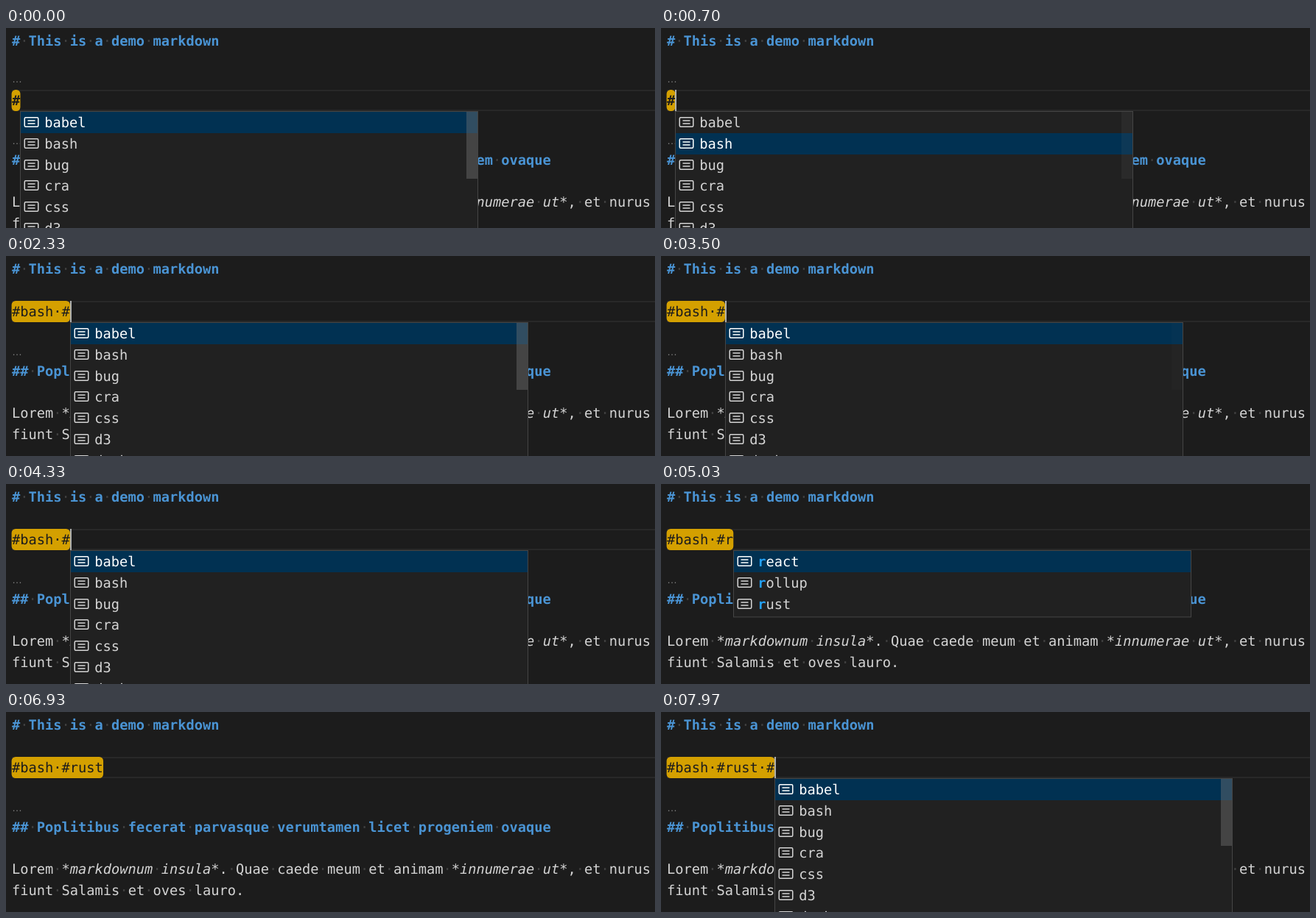
Animation of 881x272 px, one loop 8000 ms. Source, as an HTML page with a canvas:

```html
<!DOCTYPE html>
<html lang="en">
<head>
<meta charset="utf-8">
<title>Tag completion in a markdown editor</title>
<style>
  html, body { margin: 0; width: 100%; height: 100%; overflow: hidden; background: #1c1c1c; }
  canvas { display: block; }
</style>
</head>
<body>
<canvas id="stage" width="881" height="272"></canvas>
<script>
const ctx = document.getElementById('stage').getContext('2d');
const WIDTH = 881, HEIGHT = 272, LOOP = 8000;
const LEFT = 8, CHAR = 11.26, ROW = 28.8, LENS = 23, BASELINE = 21;
const MENU_WIDTH = 621, BLINK = 500;
const MONO = '18.7px "DejaVu Sans Mono", monospace';
const COLOR = {
  back: '#1c1c1c', text: '#d4d4d4', heading: '#4a94d4', dot: '#404040', lens: '#808080',
  line: '#282828', pill: '#d4a000', cursor: '#aeafad',
  menu: '#212121', border: '#454545', selected: '#013152', match: '#23a0f8',
  thumb: 'rgba(121,121,121,.4)'
};

const ALL = ['babel', 'bash', 'bug', 'cra', 'css', 'd3', 'docker'];
const R_TAGS = ['react', 'rollup', 'rust'];

// What the tag line and its suggestion list show from each moment on.
const steps = [
  { at: -550, text: '#', items: ALL, selected: 0 },
  { at: 500, text: '#', items: ALL, selected: 1 },
  { at: 920, text: '#bash' },
  { at: 1900, text: '#bash ' },
  { at: 2260, text: '#bash #', items: ALL, selected: 0 },
  { at: 4400, text: '#bash #r', items: R_TAGS, selected: 0, match: 1 },
  { at: 5250, text: '#bash #r', items: R_TAGS, selected: 1, match: 1 },
  { at: 5480, text: '#bash #r', items: R_TAGS, selected: 2, match: 1 },
  { at: 6200, text: '#bash #rust' },
  { at: 7600, text: '#bash #rust ' },
  { at: 7750, text: '#bash #rust #', items: ALL, selected: 0 }
];
const LENS_REMOVED = 1080;

function rect(x, y, w, h, color) {
  ctx.fillStyle = color;
  ctx.fillRect(x, y, w, h);
}

function write(text, x, y, color, style = '') {
  ctx.font = `${style} ${MONO}`;
  ctx.fillStyle = color;
  ctx.fillText(text, x, y);
}

// Writes words on the character grid, with a dot for every space.
function writeLine(text, column, top, color, style = '', dotColor = COLOR.dot) {
  const y = top + BASELINE;
  for (const word of text.match(/ |[^ ]+/g)) {
    const x = LEFT + column * CHAR;
    if (word === ' ') write('·', x, y, dotColor);
    else write(word, x, y, color, style);
    column += word.length;
  }
  return column;
}

function writeLens(top) {
  ctx.font = '14px "Liberation Sans", Arial, sans-serif';
  ctx.fillStyle = COLOR.lens;
  ctx.fillText('…', LEFT, top + 15);
}

function drawTagLine(text, top, heading, cursorOn) {
  const y = Math.round(top);
  rect(LEFT, y, WIDTH, 2, COLOR.line);
  rect(LEFT, y + 27, WIDTH, 2, COLOR.line);
  ctx.fillStyle = COLOR.pill;
  ctx.beginPath();
  ctx.roundRect(LEFT - .4, y, text.trim().length * CHAR + .6, 29, 5.5);
  ctx.fill();
  writeLine(text, 0, top, COLOR.back, heading ? 'bold' : '', COLOR.back);
  if (cursorOn) rect(Math.round(LEFT + text.length * CHAR), y, 2, 29, COLOR.cursor);
}

function drawIcon(x, y, color) {
  ctx.strokeStyle = color;
  ctx.lineWidth = 1.5;
  ctx.beginPath();
  ctx.roundRect(x + .75, y + .75, 18.5, 12.5, 1.5);
  ctx.moveTo(x + 5, y + 5);
  ctx.lineTo(x + 15, y + 5);
  ctx.moveTo(x + 5, y + 9);
  ctx.lineTo(x + 15, y + 9);
  ctx.stroke();
}

function drawMenu({ items, selected, match = 0 }, x, y, thumbAlpha) {
  const height = items.length * ROW + 2;
  rect(x, y, MENU_WIDTH + 1, height + 3, COLOR.border);
  rect(x + 1, y + 1, MENU_WIDTH - 1, height + 1, COLOR.menu);
  items.forEach((item, i) => {
    const top = y + 1 + i * ROW;
    const color = i === selected ? '#ffffff' : COLOR.text;
    if (i === selected) rect(x + 1, Math.round(top), MENU_WIDTH - 1, 29, COLOR.selected);
    drawIcon(x + 5.5, Math.round(top + 7), color);
    const textX = x + 33.3, base = top + BASELINE;
    write(item.slice(0, match), textX, base, COLOR.match, 'bold');
    write(item.slice(match), textX + match * CHAR, base, color);
  });
  if (items === ALL) {
    ctx.globalAlpha = thumbAlpha;
    rect(x + MENU_WIDTH - 15, y + 1, 15, 91, COLOR.thumb);
    ctx.globalAlpha = 1;
  }
}

function draw(t) {
  const step = steps.findLast(s => s.at <= t);
  const edited = steps.find(s => s.text === step.text).at;
  const cursorOn = (t - edited) % (2 * BLINK) < BLINK;
  const shift = t < LENS_REMOVED ? LENS : 0;
  const tagTop = 61 + shift;
  const headingTop = tagTop + 2 * ROW + LENS;
  const proseTop = headingTop + 2 * ROW;

  rect(0, 0, WIDTH, HEIGHT, COLOR.back);
  writeLine('# This is a demo markdown', 0, 3.2, COLOR.heading, 'bold');
  if (shift) writeLens(59);
  writeLens(headingTop - LENS + 1);
  writeLine('## Poplitibus fecerat parvasque verumtamen licet progeniem ovaque',
    0, headingTop, COLOR.heading, 'bold');

  let column = 0;
  for (const [text, style] of [
    ['Lorem '], ['*markdownum insula*', 'italic'], ['. Quae caede meum et animam '],
    ['*innumerae ut*', 'italic'], [', et nurus']
  ]) column = writeLine(text, column, proseTop, COLOR.text, style);
  writeLine('fiunt Salamis et oves lauro.', 0, proseTop + ROW, COLOR.text);

  drawTagLine(step.text, tagTop, step.text === '#', cursorOn);
  if (step.items) {
    const opened = edited < 0 ? -400 : edited;
    const thumbAlpha = Math.min(1, Math.max(0, 1 - (t - opened - 500) / 800));
    drawMenu(step, Math.round(LEFT + step.text.length * CHAR), tagTop + 29, thumbAlpha);
  }
}

ctx.textRendering = 'geometricPrecision';
const start = performance.now();
function tick() {
  draw((performance.now() - start) % LOOP);
  requestAnimationFrame(tick);
}
tick();
</script>
</body>
</html>
```
